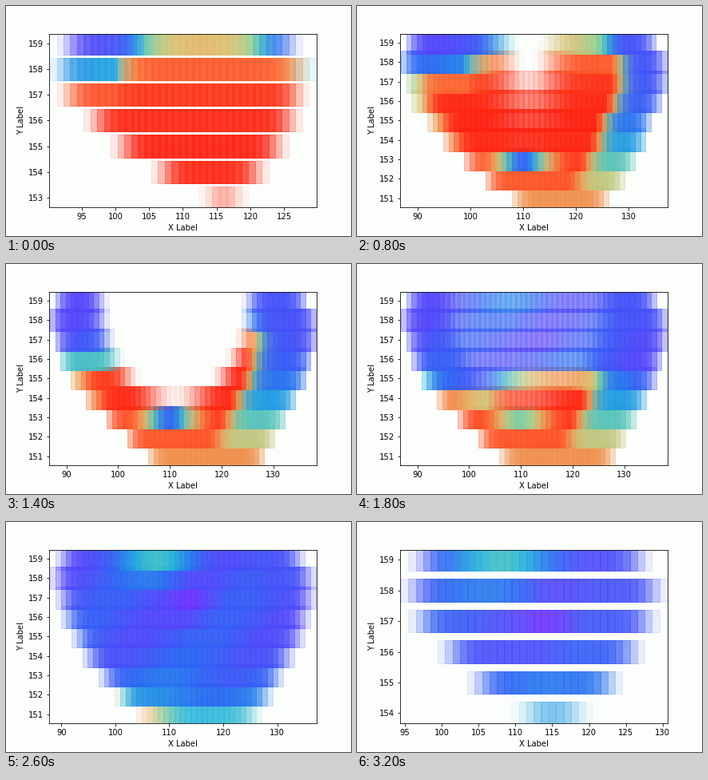
These frames come from a looping animation (432 px wide and 288 px high, 3400 ms). A matplotlib script:

```python
import numpy as np
import matplotlib.pyplot as plt
from matplotlib.animation import FuncAnimation
from matplotlib.colors import LinearSegmentedColormap

FRAMES, INTERVAL = 17, 200
TOP = 159
PAPER = "#fcfefc"
FULL_ALPHA = 0.55

plt.rcParams.update({
    "font.family": "DejaVu Sans", "font.size": 10,
    "figure.subplot.left": 0.125, "figure.subplot.right": 0.9,
    "figure.subplot.bottom": 0.125, "figure.subplot.top": 0.88,
})

heat_map = LinearSegmentedColormap.from_list("heat", [
    "#6a35ff", "#2c66f4", "#1fb4dc", "#92d49a", "#dec070", "#fb7438",
    "#ff0c06"])

x, y = np.meshgrid(np.arange(86, 140), np.arange(151, TOP + 1))
depth = TOP - y


def track(*points):
    """Piecewise linear motion through (frame, value) points."""
    times, values = zip(*points)
    return lambda frame: np.interp(frame, times, values)


def smoothstep(s):
    s = np.clip(s, 0, 1)
    return s * s * (3 - 2 * s)


# The bowl: its widest span, lowest row, and the span of that lowest row.
left_edge = track((0, 92), (2, 90), (5, 89), (11, 89), (13, 90), (14, 92),
                  (16, 96))
right_edge = track((0, 128), (2, 133), (5, 136), (11, 136), (13, 135),
                   (14, 133), (16, 129))
bottom = track((0, 153), (2, 151), (13, 151), (14, 153), (16, 154))
tip_left = track((0, 114), (2, 113), (5, 108), (12, 108), (14, 104),
                 (16, 111))
tip_right = track((0, 118), (2, 121), (5, 126), (12, 126), (14, 124),
                  (16, 119))

front = track((0, 1.3), (5, 1.5), (7, 3.2), (11, 6.6), (14, 9.5))
shore = track((0, 0), (2, 5), (5, 8), (7, 9))
edge_alpha = track((0, 0.1), (2, 0.2), (5, 0.4), (7, 0.4), (11, 0.28),
                   (14, 0.14), (16, 0.1))
hole_reach = track((2, 9), (5, 12), (7, 17.5))
refill = track((7, 0), (12, 1))
patch = track((0, 0), (2, 0.8), (7, 0.8), (12, 0))


def extent(frame):
    return (np.floor(left_edge(frame)), np.ceil(right_edge(frame)),
            np.floor(bottom(frame)))


def outline(frame):
    """First and last column of every row, narrowing towards the bottom."""
    x0, x1, y0 = extent(frame)
    taper = (np.maximum(depth - 1, 0) / (TOP - y0 - 1)) ** 1.7
    left = x0 + (tip_left(frame) - x0) * taper + (depth == 0)
    right = x1 + (tip_right(frame) - x1) * taper - 2 * (depth == 0)
    return np.round(left), np.round(right)


def level(frame, left, right):
    """Heat from 0 to 1: a cold front sinks through a warm bowl."""
    fill = refill(frame)
    u = np.clip((x - left) / np.maximum(right - left, 1), 0, 1)
    late_depth = depth / (TOP - extent(frame)[2])

    cold = 0.1 + 0.04 * np.sin(0.25 * x + 0.9 * depth)
    cold += fill * (0.25 * np.exp(-((x - 109) / 7) ** 2 - depth ** 2)
                    - 0.09 * np.exp(-((x - 115) / 3) ** 2 - (depth - 2) ** 2)
                    + 0.2 * late_depth ** 4)
    warm = 0.97 - 0.2 * (depth / 8) ** 6 - 0.25 * np.exp(-depth)

    arch = np.sin(np.pi * np.clip((u - 0.25) / 0.75, 0, 1))
    lift = 2 * (1 - fill) * np.maximum(arch, 0) ** 0.6
    embers = 1.5 * fill * np.exp(-np.maximum(x - left, 0) / 3)
    heat = 1 / (1 + np.exp(-4 * (depth - front(frame) + lift + embers)))
    v = cold + (warm - cold) * heat

    # Cool shores on both sides and a cool patch near the bottom.
    width = shore(frame)
    right_cool = smoothstep((x - right + width) / 4) * min(width, 1)
    left_cool = smoothstep(1 - (x - left) / 4) * min(width, 1)
    right_level = 0.1 + 0.75 * (depth / 8) ** 3
    left_level = 0.35 + 0.09 * depth
    v += (np.minimum(v, right_level) - v) * right_cool
    v += (np.minimum(v, left_level) - v) * left_cool
    v -= patch(frame) * np.exp(-((x - 111) / 4.5) ** 2 - 6 * (depth - 6) ** 2)
    return np.clip(v, 0, 1)


def opacity(frame, left, right):
    """Soft at the rim, with a bowl-shaped hole that opens and refills."""
    edge = edge_alpha(frame)
    inset = np.minimum(x - left, right - x)
    alpha = np.clip(edge + 0.13 * inset, 0, FULL_ALPHA)
    y0 = extent(frame)[2]
    alpha = np.where((inset >= 0) & (y >= y0), alpha, 0)
    alpha = np.where(y == y0, alpha * min(1, 0.3 + 1.8 * edge), alpha)

    reach = hole_reach(frame)
    radius = np.hypot((x - 111) / reach, depth / 6)
    hole = np.clip((1 - radius) * 0.7 * (reach - 9), 0, 1)
    return alpha * (1 - hole * (1 - refill(frame)))


fig, ax = plt.subplots(figsize=(6, 4), dpi=72, facecolor=PAPER)
ax.set_facecolor(PAPER)
ax.set_xlabel("X Label")
ax.set_ylabel("Y Label")
cells = ax.scatter(x.ravel(), y.ravel(), s=800, marker="s", linewidths=1)


def update(frame):
    left, right = outline(frame)
    colors = heat_map(level(frame, left, right).ravel())
    colors[:, 3] = opacity(frame, left, right).ravel()
    cells.set_facecolor(colors)
    cells.set_edgecolor(colors)

    x0, x1, y0 = extent(frame)
    pad_x = 0.05 * (x1 - x0)
    pad_y = 0.08 + 0.049 * (TOP - y0)
    ax.set_xlim(x0 - pad_x, x1 + pad_x)
    ax.set_ylim(y0 - pad_y, TOP + pad_y)
    return cells,


anim = FuncAnimation(fig, update, frames=FRAMES, interval=INTERVAL,
                     repeat=True, repeat_delay=0, blit=False)
plt.show()
```
